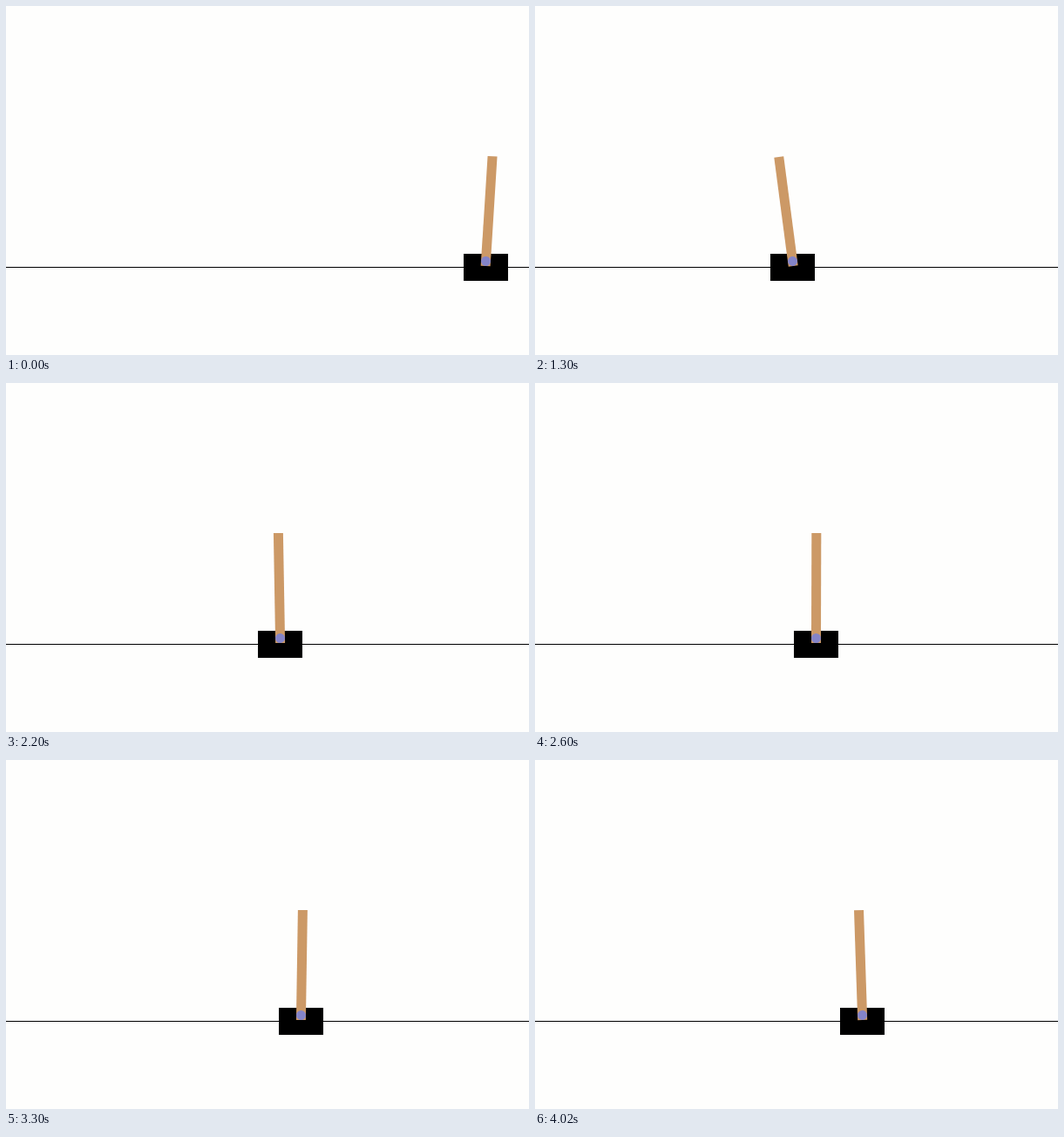
These frames come from a looping animation (600x400 px, 4040 ms). An HTML page:

```html
<!DOCTYPE html>
<html lang="en">
<head>
<meta charset="utf-8">
<title>Cart and pole</title>
<style>
  html, body { margin: 0; width: 100%; height: 100%; overflow: hidden; background: #fefefd; }
  svg { display: block; width: 600px; height: 400px; }
</style>
</head>
<body>
<svg viewBox="0 0 600 400">
  <rect y="299" width="600" height="1"/>
  <g id="cart">
    <rect x="-25" y="284" width="51" height="31"/>
    <g id="pole">
      <rect x="-5.5" y="-120.5" width="11" height="126" fill="#cc9966"/>
      <circle r="5.5" fill="#8484c8"/>
    </g>
  </g>
</svg>
<script>
const LOOP = 4040, TICK = 20;

// Turning points of the balanced run: [seconds since reset, cart x, pole angle in degrees].
const balance = [
  [0, 297, 2.8], [0.06, 294, 5], [0.52, 314, -1], [1.3, 328, 2.1],
  [1.56, 334, 1.5], [1.92, 361, -2.7], [2.34, 375, -1.9]
];

function slope(keys, i, k) {
  const a = keys[Math.max(i - 1, 0)], b = keys[Math.min(i + 1, keys.length - 1)];
  return (b[k] - a[k]) / (b[0] - a[0]);
}

// Cubic Hermite curve through the keys.
function curve(keys, s, k) {
  let i = 0;
  while (i < keys.length - 2 && s >= keys[i + 1][0]) i++;
  const a = keys[i], b = keys[i + 1], d = b[0] - a[0];
  const u = (s - a[0]) / d, v = 1 - u;
  return v * v * (1 + 2 * u) * a[k] + u * u * (3 - 2 * u) * b[k]
    + d * u * v * (v * slope(keys, i, k) - u * slope(keys, i + 1, k));
}

// Each run begins with a hard reset; s counts seconds from its start.
const runs = [
  { from: 0,    x: s => 550 + 150 * s, angle: s => 3.6 + 30 * s },
  { from: 100,  x: s => 300 - 11.7 * s + 81.9 * s ** 2 - 63.2 * s ** 3,
                angle: s => 1 - 3.6 * s - 2.9 * s ** 2 },
  { from: 1680, x: s => curve(balance, s, 1), angle: s => curve(balance, s, 2) }
];

const cart = document.getElementById("cart");
const pole = document.getElementById("pole");

function draw(t) {
  const run = runs.findLast(r => t >= r.from);
  const s = (t - run.from) / 1000;
  cart.setAttribute("transform", `translate(${Math.round(run.x(s))} 0)`);
  pole.setAttribute("transform", `translate(.5 292.5) rotate(${run.angle(s).toFixed(2)})`);
}

const start = performance.now();
function frame() {
  const t = (performance.now() - start) % LOOP;
  draw(Math.floor(t / TICK) * TICK);
  requestAnimationFrame(frame);
}
draw(0);
requestAnimationFrame(frame);
</script>
</body>
</html>
```
